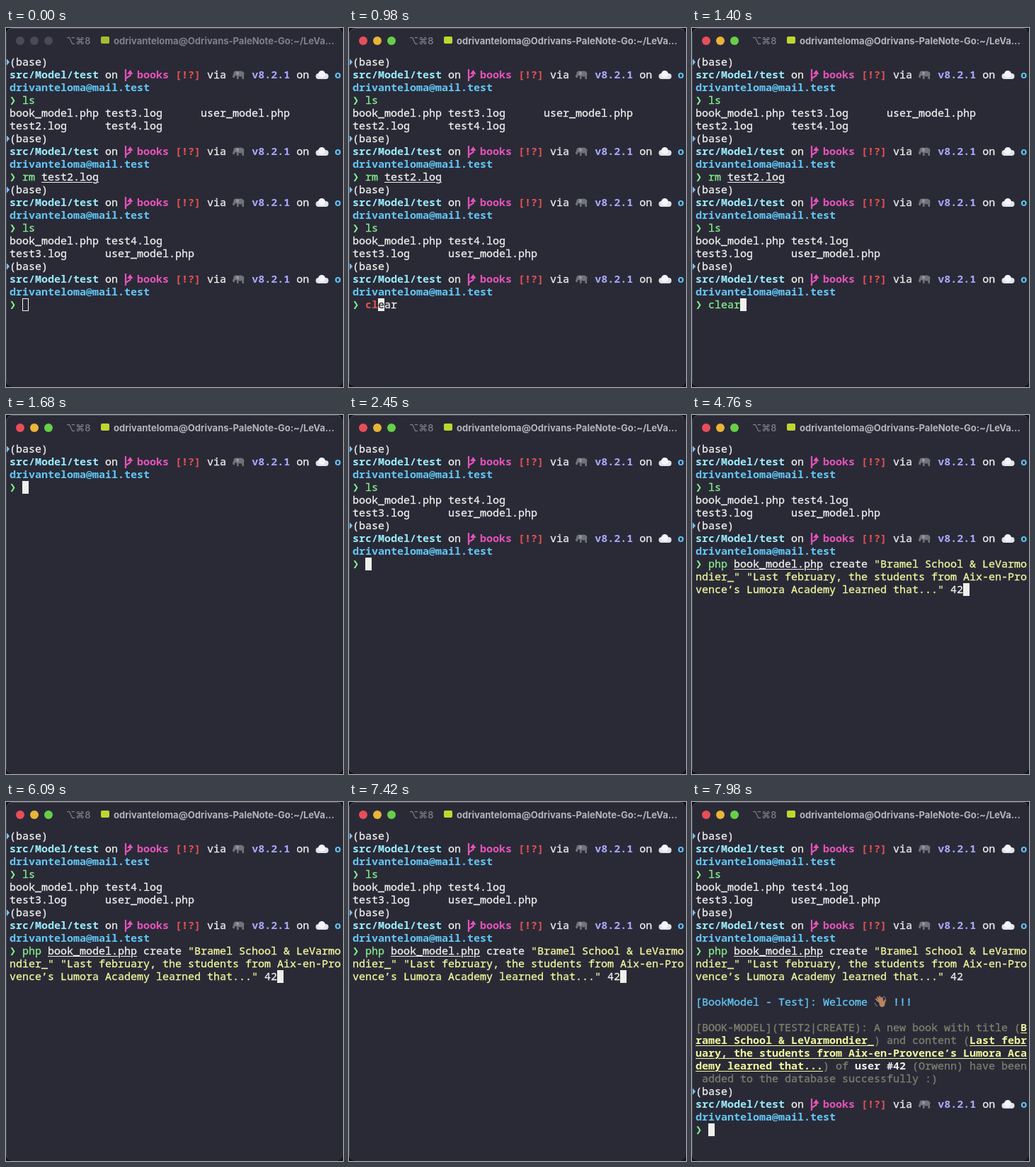
Write an HTML page that moves like this. It is 476 px wide and 506 px high and loops after 8 s.

```html
<!DOCTYPE html>
<html lang="en">
<head>
<meta charset="utf-8">
<title>Terminal session</title>
<style>
html, body { margin: 0; width: 100%; height: 100%; overflow: hidden; background: #101016; }
#win { position: absolute; left: 0; top: 0; width: 476px; height: 506px; box-sizing: border-box;
  background: #2a2a37; border: 1px solid #2a2a37; border-color: #50515d #2a2a37 #2a2a37 #454653;
  border-radius: 9px; overflow: hidden; }
#win > * { position: absolute; }
.light { top: 11px; width: 12px; height: 12px; border-radius: 50%; }
.bar { top: 7px; line-height: 20px; white-space: pre; color: #b4b4bb;
  font: 700 13px/20px Inter, "DejaVu Sans", sans-serif; }
#tab { left: 84px; font-weight: 500; color: #7f8088; }
#icon { left: 133px; top: 11px; width: 12px; height: 10px; border-radius: 2px; background: #bfd62f; }
#title { left: 151px; }
.idle .light { background: #494a56 !important; }
.idle .bar { color: #7f8088; }
.idle #icon { opacity: .85; }
#rows { left: 4px; top: 37px; color: #f1f1ee; font: 15px/18px "Noto Sans Mono", "DejaVu Sans Mono", monospace;
  font-variant-ligatures: none; -webkit-text-stroke: .3px; }
#rows div { position: relative; height: 18px; white-space: pre; }
#rows svg { height: 18px; vertical-align: top; overflow: visible; }
.bold { font-weight: 700; -webkit-text-stroke: 0; }
.u { text-decoration: underline 1px; text-underline-offset: 2px; }
.cyan { color: #9aedfe; } .blue { color: #62c8f7; } .pink { color: #e553b9; } .red { color: #e85151; }
.green { color: #86f08c; } .violet { color: #aaa8fb; } .yellow { color: #f3f99d; } .dim { color: #7e816e; }
.arrow { display: inline-block; width: 9px; line-height: 0; color: #84f58a;
  font-family: "DejaVu Sans Mono", monospace; }
.mark { position: absolute; left: -5px; top: 4px; border: solid transparent; border-width: 6px 0 6px 5px;
  border-left-color: #7fbfec; }
.cur { display: inline-block; position: relative; top: 1px; width: 9px; height: 18px; line-height: 16px;
  vertical-align: top; box-sizing: border-box; background: #eff0eb; color: #2a2a37; }
.idle .cur { background: none; border: 1px solid #eff0eb; }
</style>
</head>
<body>
<div id="win">
  <i class="light" style="left:13px;background:#e84e58"></i>
  <i class="light" style="left:33px;background:#e9b437"></i>
  <i class="light" style="left:53px;background:#66cf48"></i>
  <span class="bar" id="tab">⌥⌘8</span>
  <i id="icon"></i>
  <span class="bar" id="title">odrivanteloma@Odrivans-PaleNote-Go:~/LeVa...</span>
  <div id="rows"></div>
</div>
<script>
const LOOP = 8000;
const MAIL = 'odrivanteloma@mail.test';
const win = document.getElementById('win'), view = document.getElementById('rows');

const span = (cls, text) => `<span class="${cls}">${text}</span>`;
const icon = (width, body) => `<svg width="${width}">${body}</svg>`;
const cursor = (ch = ' ') => span('cur', ch);
const line = text => span('arrow bold', '❯') + ' ' + text;

const branch = icon(9, `<path d="M2 2V19M2 15L8.5 11V7" fill="none" stroke="#e553b9" stroke-width="2.2"/>
  <path d="M4 9L8.500 3L12.500 9Z" fill="#e553b9"/>`);
const elephant = icon(18, `<g fill="#6f7379"><ellipse cx="11" cy="8.5" rx="5.5" ry="4"/>
  <circle cx="5" cy="8" r="3.5"/><path d="M2 7L0 12Q0 15 3 14V12.500L4 10ZM6 10H8.500V16H6ZM13 9H16V16H13.500Z"/></g>
  <ellipse cx="7" cy="7.5" rx="1.8" ry="2.800" fill="#94989d"/>`);
const cloud = icon(18, `<g fill="#dfe3ea"><circle cx="4.5" cy="12" r="4"/><circle cx="14.5" cy="12" r="4"/>
  <rect x="4" y="9" width="11" height="7"/></g><circle cx="9" cy="9" r="5" fill="#f4f5f8"/>`);
const hand = icon(18, `<g stroke="#b98362" stroke-width="2.3" stroke-linecap="round">
  <path d="M10 12L3 6M10 10L5 3.5M11 9L8 2.5M12 9L11.500 4M14 12L16 7"/></g>
  <ellipse cx="11.500" cy="12.500" rx="4" ry="4.500" fill="#b98362"/>
  <path d="M1 11Q2 15 5 16M13 2Q16 3 17 5" fill="none" stroke="#8d9097"/>`);

const prompt = [
  span('mark', '') + '(base)',
  span('cyan bold', 'src/Model/test') + ' on ' + branch + ' ' + span('pink bold', 'books') + ' ' +
    span('red bold', '[!?]') + ' via ' + elephant + ' ' + span('violet bold', 'v8.2.1') + ' on ' +
    cloud + ' ' + span('blue bold', MAIL[0]),
  span('blue bold', MAIL.slice(1))
];
const ls = line(span('green', 'ls'));
const listing = ['book_model.php test4.log', 'test3.log      user_model.php'];
const history = [
  ...prompt, ls, 'book_model.php test3.log      user_model.php', 'test2.log      test4.log',
  ...prompt, line(span('green', 'rm') + ' ' + span('u', 'test2.log')),
  ...prompt, ls, ...listing, ...prompt
];

const quote = ['"Bramel School & LeVarmo', 'ndier_" "Last february, the students from Aix-en-Pro',
  'vence’s Lumora Academy learned that..."'];
const command = [
  line(span('green', 'php') + ' ' + span('u', 'book_model.php') + ' create ' + span('yellow', quote[0])),
  span('yellow', quote[1]),
  span('yellow', quote[2]) + ' 42'
];
const hot = text => span('yellow bold u', text), dim = text => span('dim', text);
const output = [
  '', span('blue', '[BookModel - Test]: Welcome ' + hand + ' !!!'), '',
  dim('[BOOK-MODEL](TEST2|CREATE): A new book with title (') + hot('B'),
  hot('ramel School & LeVarmondier_') + dim(') and content (') + hot('Last febr'),
  hot('uary, the students from Aix-en-Provence’s Lumora Aca'),
  hot('demy learned that...') + dim(') of ') + span('bold', 'user #42') + dim(' (Orwenn) have been'),
  dim(' added to the database successfully :)')
];

// A word typed at the given key times, with the rest shown as a suggestion.
function typed(t, word, keys, tail = '') {
  const n = keys.filter(k => t >= k).length, full = word + tail;
  if (!n) return line(cursor());
  return line(span(n < word.length ? 'red bold' : 'green', word.slice(0, n)) +
    cursor(full[n]) + full.slice(n + 1));
}

function screen(t) {
  if (t < 1470) return [...history, typed(t, 'clear', [840, 980, 1050, 1120, 1190])];
  if (t < 1610) return [cursor()];
  if (t < 2170) return [...prompt, typed(t, 'ls', [1890, 1960])];
  if (t < 2240) return [...prompt, ls, cursor()];
  const top = [...prompt, ls, ...listing];
  if (t < 2380) return [...top, cursor()];
  top.push(...prompt);
  if (t < 3430) return [...top, line(cursor())];
  if (t < 4760) return [...top, typed(t, 'php', [3430, 3640, 3780], ' book_model.php create ' + quote[0]),
    quote[1], quote[2] + ' 42'];
  top.push(...command);
  if (t < 7630) return [...top.slice(0, -1), top[top.length - 1] + cursor()];
  if (t < 7770) return [...top, cursor()];
  top.push(...output);
  return t < 7910 ? [...top, cursor()] : [...top, ...prompt, line(cursor())];
}

let shown = '';
function draw() {
  const t = performance.now() % LOOP;
  win.className = t < 350 ? 'idle' : '';
  const html = screen(t).map(row => `<div>${row}</div>`).join('');
  if (html !== shown) view.innerHTML = shown = html;
  requestAnimationFrame(draw);
}
draw();
</script>
</body>
</html>
```
